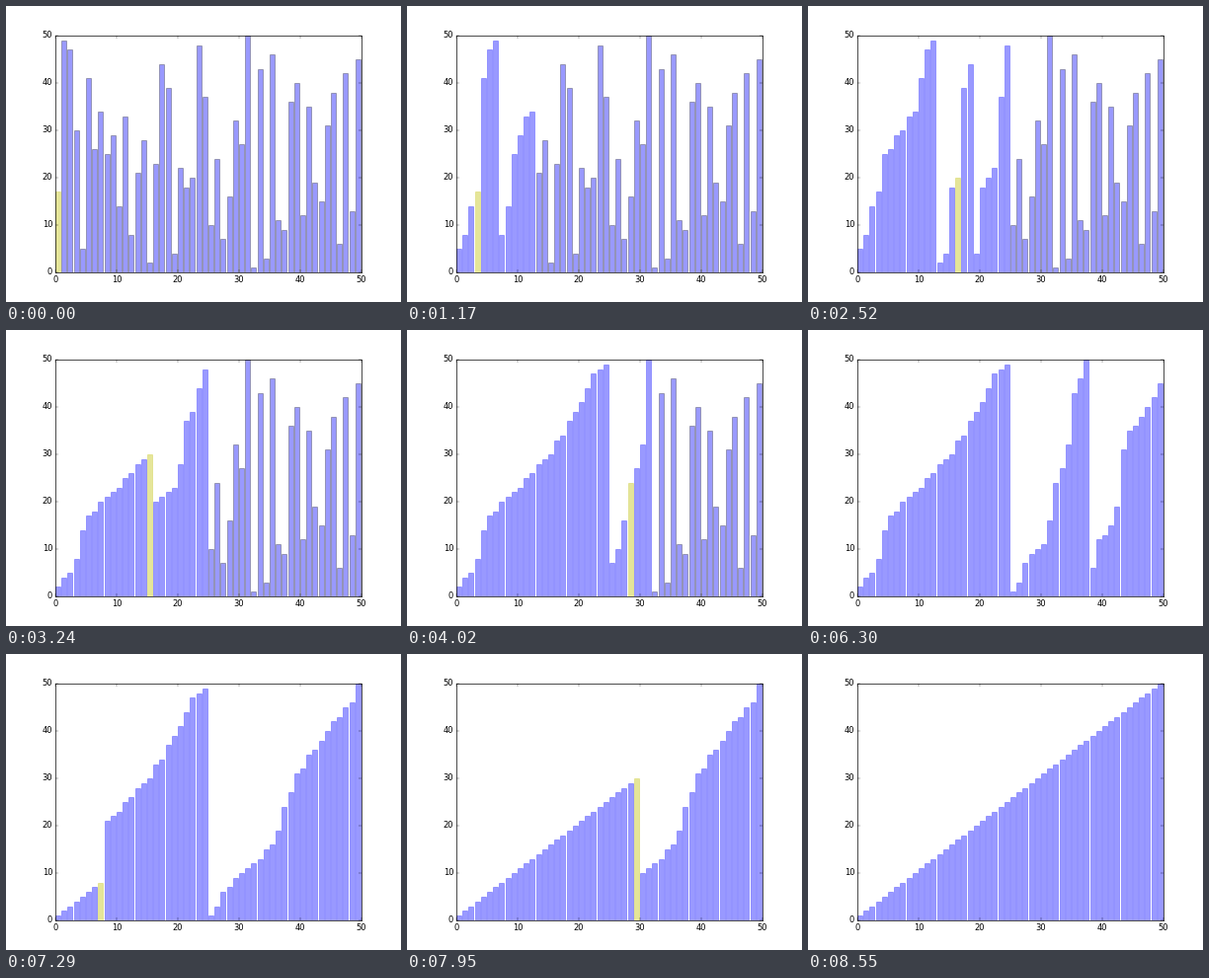
Write a matplotlib script that moves like this. It is 400 px wide and 300 px high and loops after 8.58 s.

```python
import matplotlib.pyplot as plt
from matplotlib.animation import FuncAnimation

plt.style.use("classic")
plt.rcParams.update({"savefig.dpi": "figure", "font.family": "DejaVu Sans"})

START = [
    17, 49, 47, 30, 5, 41, 26, 34, 25, 29, 14, 33, 8, 21, 28, 2, 23,
    44, 39, 4, 22, 18, 20, 48, 37, 10, 24, 7, 16, 32, 27, 50, 1, 43,
    3, 46, 11, 9, 36, 40, 12, 35, 19, 15, 31, 38, 6, 42, 13, 45,
]
N = len(START)
IDLE, DONE, ACTIVE = ("b", "k"), ("b", "b"), ("y", "y")  # (face, edge)


def merge_sort(data, tones, lo, hi):
    """Sort data[lo..hi] in place, yielding a snapshot after every write."""
    if lo >= hi:
        return
    mid = (lo + hi) // 2
    yield from merge_sort(data, tones, lo, mid)
    yield from merge_sort(data, tones, mid + 1, hi)
    # Both halves are sorted, so their merge is the sorted slice.
    for pos, value in enumerate(sorted(data[lo:hi + 1]), lo):
        data[pos] = value
        if pos > lo:
            tones[pos - 1] = DONE
        tones[pos] = ACTIVE if pos < hi else DONE
        yield data[:], tones[:]


steps = list(merge_sort(START[:], [IDLE] * N, 0, N - 1))

fig = plt.figure(figsize=(8, 6), dpi=50, facecolor="w")
ax = fig.add_axes([0.125, 0.1, 0.775, 0.8])
bars = ax.bar(range(N), START, width=0.8, align="edge",
              color="b", edgecolor="k", alpha=0.4)
ax.set_xlim(0, N)
ax.set_ylim(0, N)


def draw(i):
    for bar, height, (face, edge) in zip(bars, *steps[i]):
        bar.set_height(height)
        bar.set_facecolor(face)
        bar.set_edgecolor(edge)
    return list(bars)


anim = FuncAnimation(fig, draw, frames=len(steps), interval=30,
                     repeat=True, repeat_delay=0, blit=False)
plt.show()
```
